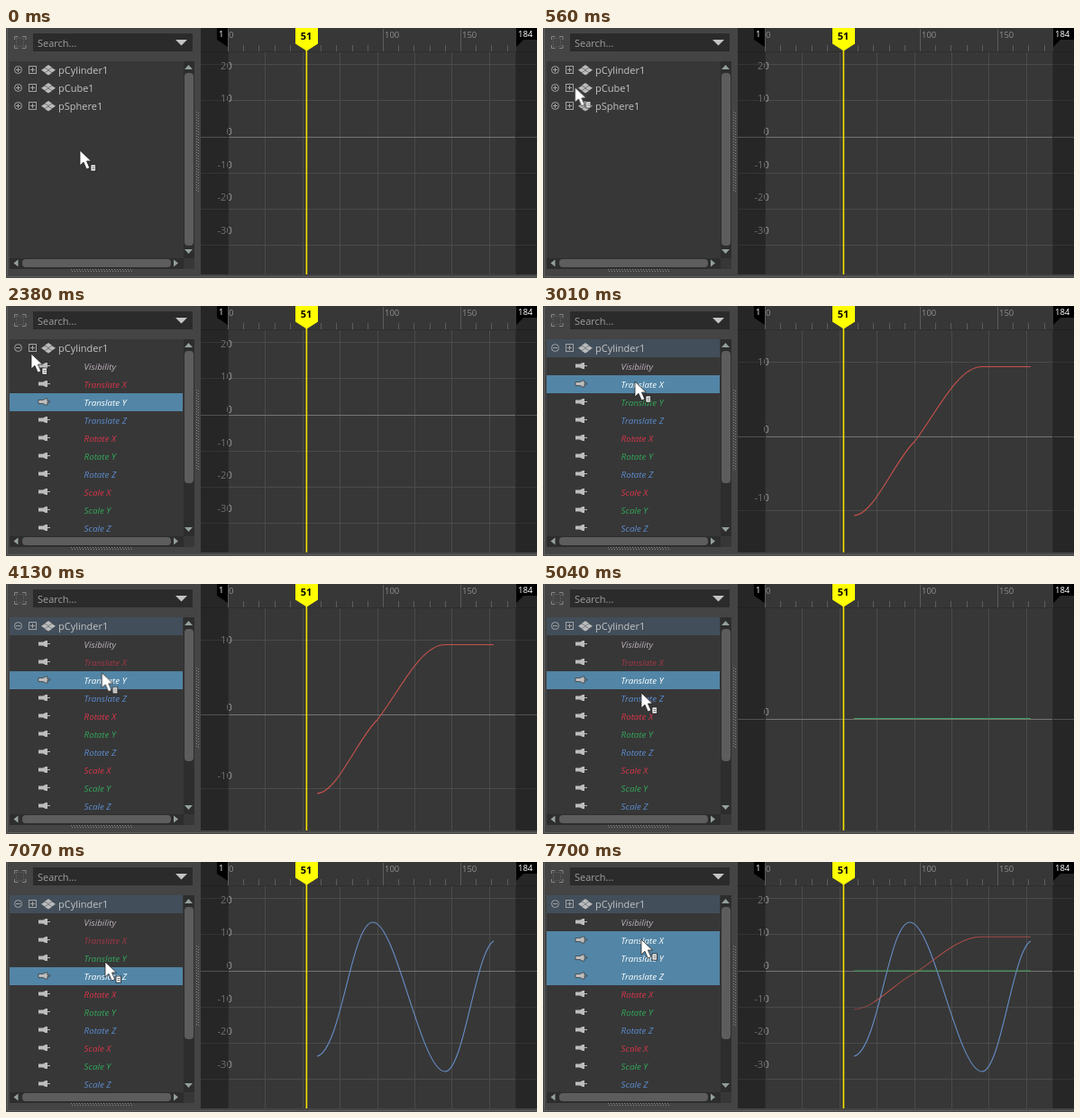
An HTML page that plays this animation: 589x278 px, repeating every 8000 ms.

```html
<!DOCTYPE html>
<html lang="en">
<head>
<meta charset="utf-8">
<title>Curve editor</title>
<style>
html, body { margin: 0; width: 100%; height: 100%; overflow: hidden; background: #444; }
svg { display: block; width: 589px; height: 278px; font: 11px "Open Sans", "Noto Sans", sans-serif; }
.crisp { shape-rendering: crispEdges; }
.name { fill: #c4c4c4; }
.attr { font-size: 9.8px; font-style: italic; }
.V { fill: #bdb1bd; } .X { fill: #d6364a; } .Y { fill: #33a65a; } .Z { fill: #5c8cd0; }
.dim { fill: #a03845; }
.white { fill: #fff; }
.arrow { fill: #93a09c; }
.ruler { font-size: 9.5px; }
.label { fill: #a0a0a0; text-anchor: end; }
.curve { fill: none; stroke-width: 1.1; vector-effect: non-scaling-stroke; }
.cx { stroke: #c8524c; } .cy { stroke: #3f9c56; } .cz { stroke: #678fc8; }

/* 8 s loop; switches are hard cuts */
.closed, .open, .head, .selX, .selY, .selZ, .dimX, .wide, .viewX, .viewY, .waveZ, .both {
  animation: 8s step-end infinite;
}
.closed { animation-name: closed; }
.open { animation-name: open; }
.head { animation-name: head; }
.selX { animation-name: selX; }
.selY { animation-name: selY; }
.selZ { animation-name: selZ; }
.dimX { animation-name: dimX; }
.wide { animation-name: wide; }
.viewX { animation-name: viewX; }
.viewY { animation-name: viewY; }
.waveZ { animation-name: waveZ; }
.both { animation-name: both; }
@keyframes closed { 0% { opacity: 1 } 20.12%, 100% { opacity: 0 } }
@keyframes open { 0% { opacity: 0 } 20.12%, 100% { opacity: 1 } }
@keyframes head { 0% { opacity: 0 } 37.62%, 100% { opacity: 1 } }
@keyframes selX { 0%, 50.74% { opacity: 0 } 35.87%, 94.49%, 100% { opacity: 1 } }
@keyframes selY { 0%, 35.87%, 64.74% { opacity: 0 } 20.12%, 50.74%, 94.49%, 100% { opacity: 1 } }
@keyframes selZ { 0% { opacity: 0 } 64.74%, 100% { opacity: 1 } }
@keyframes dimX { 0%, 94.49%, 100% { opacity: 0 } 50.74% { opacity: 1 } }
@keyframes wide { 0%, 65.62%, 100% { opacity: 1 } 37.62% { opacity: 0 } }
@keyframes viewX { 0%, 52.49%, 100% { opacity: 0 } 37.62% { opacity: 1 } }
@keyframes viewY { 0%, 65.62%, 100% { opacity: 0 } 52.49% { opacity: 1 } }
@keyframes waveZ { 0% { opacity: 0 } 65.62%, 100% { opacity: 1 } }
@keyframes both { 0% { opacity: 0 } 96.24%, 100% { opacity: 1 } }

/* the pointer is sampled every 70 ms while it moves */
.pointer { animation: pointer 8s step-end infinite; }
@keyframes pointer {
  0% { transform: translate(82px, 136px) }
  1.74% { transform: translate(82px, 136px); animation-timing-function: steps(3, start) }
  4.37% { transform: translate(69px, 117px); animation-timing-function: steps(5, start) }
  8.74% { transform: translate(27px, 53px); animation-timing-function: steps(3, start) }
  11.37% { transform: translate(18px, 39px) }
  16.62% { transform: translate(17px, 40px) }
  29.74% { transform: translate(17px, 40px); animation-timing-function: steps(1, start) }
  30.61% { transform: translate(28px, 53px); animation-timing-function: steps(3, start) }
  33.24% { transform: translate(84px, 78px); animation-timing-function: steps(2, start) }
  34.99% { transform: translate(102px, 84px) }
  47.24% { transform: translate(102px, 84px); animation-timing-function: steps(7, start) }
  53.37% { transform: translate(107px, 101px) }
  60.37% { transform: translate(107px, 101px); animation-timing-function: steps(4, start) }
  63.87% { transform: translate(109px, 121px) }
  88.37% { transform: translate(109px, 121px); animation-timing-function: steps(1, start) }
  89.24% { transform: translate(110px, 111px); animation-timing-function: steps(4, start) }
  92.74%, 100% { transform: translate(109px, 86px) }
}
</style>
</head>
<body>
<svg viewBox="0 0 589 278">
  <defs>
    <path id="tile" d="M0 -2.6l4 2.6-4 2.6-4-2.6z" fill="#bbb" stroke="none"/>
    <g id="node" stroke="#a2a2a2" fill="none">
      <rect x="25.5" y="-4.5" width="8" height="8"/>
      <path d="M27 -.5h5M29.5 -3v5"/>
      <use href="#tile" x="47" y="-3.3"/><use href="#tile" x="43" y="-.2"/>
      <use href="#tile" x="51" y="-.2"/><use href="#tile" x="47" y="2.9"/>
    </g>
    <g id="ring" stroke="#a2a2a2" fill="none"><circle cx="13.5" cy="-.5" r="4"/><path d="M11 -.5h5"/></g>
    <path id="plug" d="M36 -2.5h5l3-1.500h2v3h3v1h-3v3h-2l-3-1.500h-5z"/>
    <path id="rise" d="M345 233C367 233 391 170 412 151C437 118 460 67.5 487 67.5H541"/>
  </defs>

  <!-- outliner panel -->
  <g class="crisp">
    <rect width="589" height="278" fill="#444"/>
    <rect x="1" width="1" height="276" fill="#5e5e5e"/>
    <rect x="1" y="276" width="588" height="1" fill="#5e5e5e"/>
    <rect x="30" y="6" width="177" height="20" fill="#2b2b2b"/>
    <rect x="4" y="37" width="205" height="231" fill="#373737"/>
    <rect x="197" y="37" width="12" height="219" fill="#2d2d2d"/>
    <rect x="4" y="256" width="193" height="12" fill="#2d2d2d"/>
  </g>
  <path d="M9.500 13v-3.500h4M18 9.500h4v3.500M22 19v3.500h-4M13.500 22.500h-4v-3.500" fill="none" stroke="#858585"/>
  <rect x="11.500" y="11.500" width="8" height="9" fill="none" stroke="#707070" stroke-dasharray="1 2"/>
  <text x="35" y="20.700" fill="#a0a0a0">Search...</text>
  <path d="M188 13h13l-6.500 6.500z" fill="#c4c4c4"/>
  <path class="arrow" d="M198 46l4.500-5 4.500 5zM198 246h9l-4.500 5zM13.500 257.500v8l-5-4zM186 257.500v8l5-4z"/>
  <rect x="18" y="257" width="165" height="9" rx="4" fill="#5d5d5d"/>
  <rect class="closed" x="198" y="50" width="10" height="192" rx="4" fill="#5d5d5d"/>
  <rect class="open" x="198" y="50" width="10" height="147" rx="4" fill="#5d5d5d"/>
  <path d="M72 268.500h68M73 270.500h68" stroke="#858585" stroke-dasharray="1 2"/>
  <path d="M211.500 93v88M213.500 94v88" stroke="#858585" stroke-dasharray="1 2"/>
  <g id="closed" class="closed"></g>
  <g id="open" class="open"></g>

  <!-- graph -->
  <g class="crisp">
    <rect x="216" width="373" height="274" fill="#373737"/>
    <path id="columns" stroke="#4b4b4b"/>
    <path id="ticks" stroke="#5c5c5c"/>
    <rect x="216" y="26" width="373" height="1" fill="#2e2e2e"/>
  </g>
  <g id="views"></g>
  <g class="waveZ"><path class="curve cz" d="M345 216C372 210 383 67 407 67C433 67 460 233 487 233C508 233 521 98 541 88"/></g>
  <g class="both">
    <use href="#rise" class="curve cx" transform="translate(0 50.200) scale(1 .488)"/>
    <path class="curve cy" d="M345 121H541"/>
  </g>
  <g class="viewX"><use href="#rise" class="curve cx"/></g>
  <g class="viewY"><path class="curve cy" d="M345 149.500H541"/></g>
  <path class="crisp" d="M216 0h30v274h-30zM566 0h23v274h-23z" fill="#000" fill-opacity=".3"/>
  <path class="crisp" d="M246 27v247M565.500 27v247" stroke="#2b2b2b"/>
  <g class="ruler" fill="#919191">
    <text x="247" y="11">0</text><text x="420" y="11">100</text><text x="506" y="11">150</text>
    <path d="M234 0h12v21l-12-8zM566 0h23v13h-15l-8 8z" fill="#000"/>
    <text class="white" x="236" y="10">1</text><text class="white" x="568" y="10">184</text>
  </g>
  <rect x="332.600" y="24" width="1.600" height="250" fill="#f2e000"/>
  <path d="M321 0h25v17.500l-12.500 8-12.500-8z" fill="#ff0"/>
  <text x="333" y="12.700" font-weight="700" text-anchor="middle">51</text>

  <g class="pointer">
    <path d="M0 0V17L4 13.300 7.300 21 10.800 19.500 7.500 12H12.500Z" fill="#fff" stroke="#222" stroke-width=".8"/>
    <rect x="12" y="16" width="5.500" height="7" fill="#fff" stroke="#222" stroke-width=".8"/>
    <path d="M13.500 18.500h3M13.500 20.500h3" stroke="#444" stroke-width=".8"/>
  </g>
</svg>
<script>
const put = (id, html) => document.getElementById(id).innerHTML = html;
const rowY = i => 47 + 20 * i;
const bar = (i, fill, cls) => `<rect class="crisp ${cls}" x="4" y="${rowY(i) - 10}" width="192" height="20" fill="${fill}"/>`;
const node = (i, name) => `<use href="#node" y="${rowY(i)}"/><use href="#ring" y="${rowY(i)}"/>
  <text class="name" x="58" y="${rowY(i) + 4}">${name}</text>`;

put('closed', ['pCylinder1', 'pCube1', 'pSphere1'].map((name, i) =>
  node(i, name) + `<path d="M13.500 ${rowY(i) - 3}v5" stroke="#a2a2a2"/>`).join(''));

const attrs = ['Visibility'];
for (const kind of ['Translate', 'Rotate', 'Scale'])
  for (const axis of 'XYZ') attrs.push(`${kind} ${axis}`);

const attrRow = (name, k) => {
  const i = k + 1, axis = k ? name.at(-1) : 'V';
  const text = cls => `<text class="attr ${cls}" x="86.600" y="${rowY(i) + 4}">${name}</text>`;
  const plug = stroke => `<use href="#plug" y="${rowY(i)}" fill="#bdbdbd" stroke="${stroke}" stroke-width=".7"/>`;
  const plain = text(axis) + plug('none');
  if (!name.startsWith('Translate')) return plain;
  const faded = axis === 'X' ? `<g class="dimX">${bar(i, '#373737', '')}${text('dim')}${plug('none')}</g>` : '';
  return plain + faded +
    `<g class="sel${axis}">${bar(i, '#5285a6', '')}${text('white')}${plug('#333')}</g>`;
};
put('open', bar(0, '#424e5a', 'head') + node(0, 'pCylinder1') + attrs.map(attrRow).join(''));

// time axis
let columns = '', ticks = '';
for (let i = 1; i <= 7; i++) columns += `M${Math.round(246 + 41.4 * i) + .5} 27V274`;
for (let f = 0; f <= 180; f += 10)
  ticks += `M${Math.round(246 + 1.72 * f) + .5} ${f % 50 ? 19 : 1}V26`;
document.getElementById('columns').setAttribute('d', columns);
document.getElementById('ticks').setAttribute('d', ticks);

// value axis: grid lines and labels have their own spacing
const view = (cls, zero, gap, labelY, labelGap, top, bottom) => {
  let out = '';
  for (let v = top; v >= bottom; v--) {
    const y = Math.round(zero - v * gap) + .5;
    out += `<path class="crisp" d="M216 ${y}H589" stroke="${v ? '#4b4b4b' : '#757575'}"/>
      <text class="label" x="250.700" y="${labelY - v * labelGap}">${v * 10}</text>`;
  }
  return `<g class="${cls}">${out}</g>`;
};
put('views',
  view('wide', 120.6, 40.2, 119, 36.6, 2, -3) +
  view('viewX', 144.6, 82.6, 141, 75.5, 1, -1) +
  view('viewY', 149.6, 0, 146, 0, 0, 0));
</script>
</body>
</html>
```
